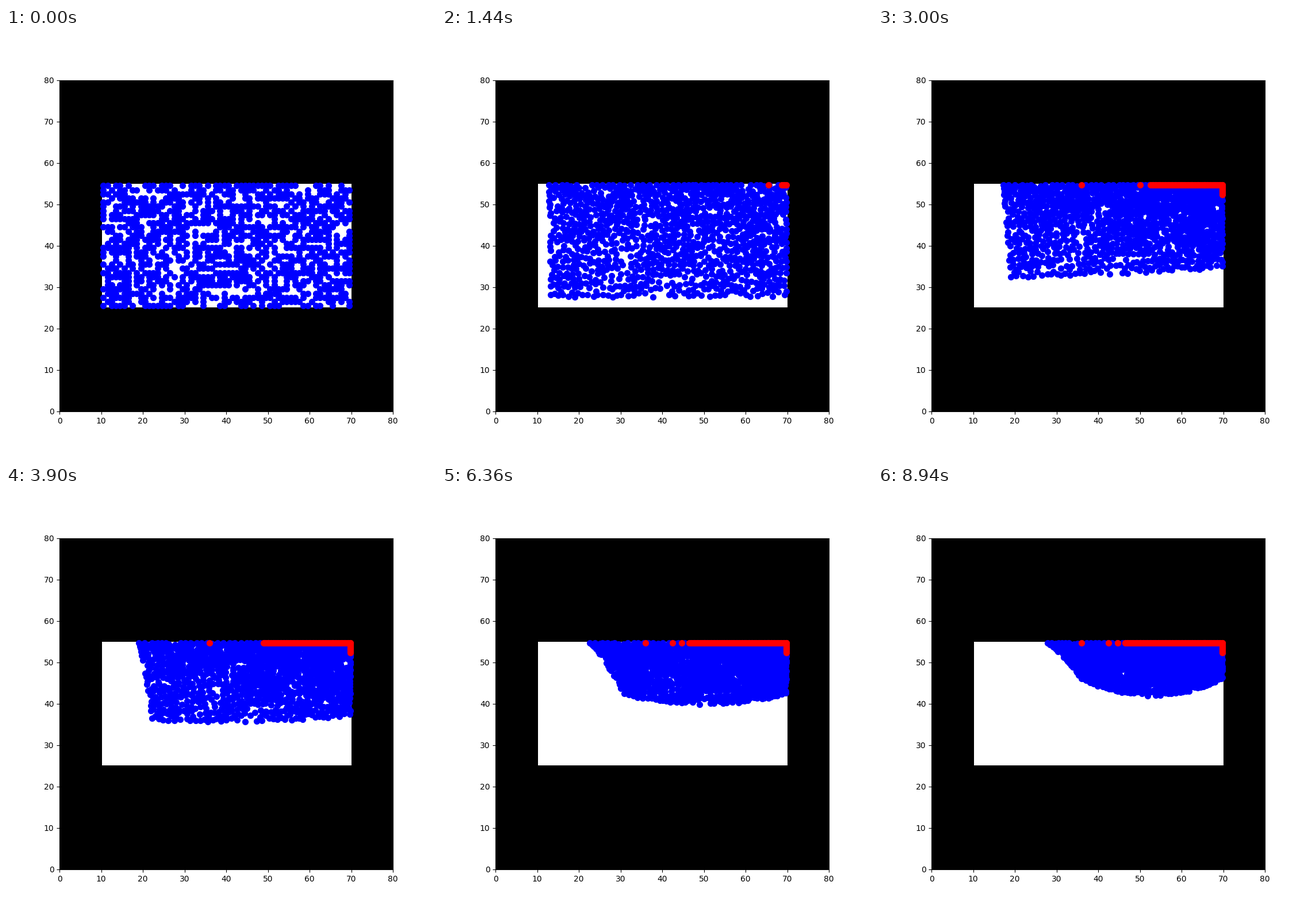
These frames come from a looping animation (748 by 748 pixels, 9000 ms). A matplotlib script:

```python
import numpy as np
import matplotlib.pyplot as plt
from matplotlib.animation import FuncAnimation
from matplotlib.patches import Rectangle

FRAMES, STEP = 150, 60
COLS, ROWS = 60, 30
RIGHT, TOP = 69.72, 54.72
rng = np.random.default_rng(12)

# Key points of the crowd's top left end and of its lower edge
TIMES = np.array([0, 1.5, 3, 5, 6.5, 9])
END_X = np.array([10.5, 12.9, 17, 21, 22.8, 27.9])
LOW_Y = np.array([25.5, 27.8, 33.2, 38, 40, 42])


def track(keys, t):
    """Smooth curve through the key values."""
    i = min(np.searchsorted(TIMES, t, side="right"), len(TIMES) - 1) - 1
    slope = np.gradient(keys, TIMES)
    h = TIMES[i + 1] - TIMES[i]
    s = (t - TIMES[i]) / h
    ease = s * s * (3 - 2 * s)
    bend = s * (1 - s) ** 2 * slope[i] - s * s * (1 - s) * slope[i + 1]
    return keys[i] + (keys[i + 1] - keys[i]) * ease + h * bend


def spread(x, y, reach=1.35, rounds=20):
    """Push close neighbours apart inside the room."""
    x = x + rng.normal(0, .1, x.size)
    y = y + rng.normal(0, .1, y.size)
    for _ in range(rounds):
        dx, dy = x[:, None] - x, y[:, None] - y
        r = np.sqrt(dx * dx + dy * dy) + 1e-4
        push = .16 * np.maximum(reach - r, 0) / r
        x = np.clip(x + (push * dx).sum(1), 0, COLS - 1)
        y = np.clip(y + (push * dy).sum(1), 0, ROWS - 1)
    return x, y


y0, x0 = np.nonzero(rng.random((ROWS, COLS)) < .58)
x1, y1 = spread(x0, y0)
phase = rng.uniform(0, 2 * np.pi, (2, x0.size))
rate = rng.uniform(1, 3, (2, x0.size))
rough = rng.uniform(0, .6, x0.size)


def crowd(t):
    mix = 1 - np.exp(-1.8 * t)
    wob = .2 * np.sin(rate * t + phase)
    u = np.clip((x0 + (x1 - x0 + wob[0]) * mix) / (COLS - 1), 0, 1)
    v = np.clip((y0 + (y1 - y0 + wob[1] + rough) * mix) / (ROWS - 1), 0, 1)

    # Pack towards the top right corner
    pack = .4 * min(t / 3, 1)
    u = u + .6 * pack * u * (1 - u)
    v = v + pack * v * (1 - v)

    lean = 8.3 * min(t / 6.3, 1) ** 2
    sag = 4 * np.clip((t - 2.5) / 6.5, 0, 1)
    tilt = 1.2 * np.exp(-(t - 3) ** 2)
    across = 2 * u - 1
    left = track(END_X, t) + lean * (1 - v) ** .8
    low = track(LOW_Y, t) + sag * across ** 2 + tilt * across
    right = RIGHT - .22 * (1 - mix)
    top = TOP - .22 * (1 - mix)
    return np.column_stack([left + (right - left) * u, low + (top - low) * v])


def stopped_dots():
    """Rows of x, y and the time at which the dot stops."""
    strays = [(65.5, TOP, 1.4), (50, TOP, 2.5), (36, TOP, 2.7),
              (42.4, TOP, 4), (44.6, TOP, 4.7)]
    q = np.linspace(0, 1, 70)
    wall = np.column_stack([RIGHT - 23.2 * q, np.full(q.size, TOP),
                            1.3 + 2 * q + 1.8 * q ** 8 + rng.uniform(-.1, .1, q.size)])
    q = np.linspace(0, 1, 7)
    side = np.column_stack([np.full(q.size, RIGHT), TOP - 2.4 * q, 1.8 + 1.1 * q])
    return np.vstack([strays, wall, side])


stopped = stopped_dots()

fig, ax = plt.subplots(figsize=(7.48, 7.48), dpi=100)
fig.subplots_adjust(left=.1245, right=.9, bottom=.1085, top=.8785)
ax.set_facecolor("black")
ax.set_xlim(0, 80)
ax.set_ylim(0, 80)
ax.add_patch(Rectangle((10.19, 25.12), 59.85, 29.86, fc="white", lw=0))
blue = ax.scatter([], [], s=50, zorder=3, color="blue")
red = ax.scatter([], [], s=50, zorder=4, color="red")


def draw(n):
    t = n * STEP / 1000
    blue.set_offsets(crowd(t))
    red.set_offsets(stopped[stopped[:, 2] <= t, :2])
    return blue, red


anim = FuncAnimation(fig, draw, frames=FRAMES, interval=STEP, repeat=True,
                     repeat_delay=0, init_func=lambda: draw(0))
plt.show()
```
